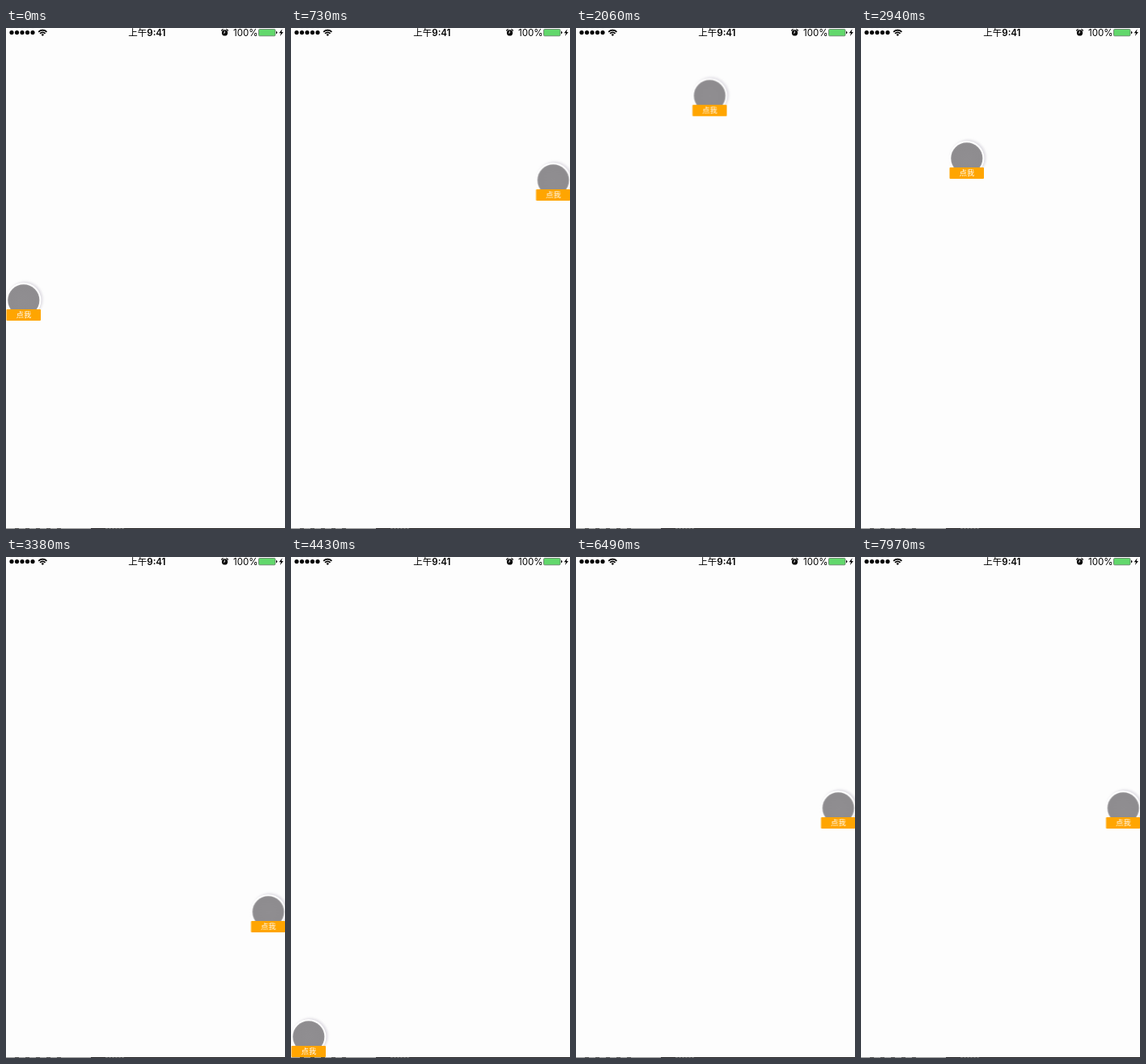
Write an HTML page that moves like this. It is 345x618 px and loops after 9880 ms.

```html
<!DOCTYPE html>
<html lang="zh-CN">
<head>
<meta charset="utf-8">
<title>Floating button</title>
<style>
  html, body { margin: 0; width: 100%; height: 100%; overflow: hidden; background: #fdfdfd; }
  svg { display: block; width: 345px; height: 618px; }
  text { font-family: Inter, "Noto Sans CJK SC", "Noto Sans CJK", sans-serif; }
</style>
</head>
<body>
<svg viewBox="0 0 345 618">
  <defs>
    <radialGradient id="disk">
      <stop offset="0" stop-color="#908e91"/>
      <stop offset=".9" stop-color="#8e8c8f"/>
      <stop offset="1" stop-color="#989699"/>
    </radialGradient>
    <filter id="soft" x="-30%" y="-30%" width="160%" height="160%">
      <feGaussianBlur stdDeviation="1.5"/>
    </filter>
  </defs>
  <rect width="345" height="618" fill="#fdfdfd"/>

  <g id="status">
    <path d="M7 5.6H34" stroke="#000" stroke-width="5.2" stroke-linecap="round" stroke-dasharray="0 6.5"/>
    <g fill="none" stroke="#000" stroke-width="1.7">
      <path d="M40.2 4.8A7.3 7.3 0 0 1 50.4 4.8"/>
      <path d="M42.1 6.8A4.5 4.5 0 0 1 48.5 6.8"/>
    </g>
    <path d="M43.6 8.2A2.4 2.4 0 0 1 47 8.2L45.3 10Z"/>
    <text x="174.4" y="9.6" font-size="11.5" font-weight="600" text-anchor="middle"><tspan font-weight="500">上午</tspan>9:41</text>
    <circle cx="270.5" cy="5.9" r="3.6"/>
    <path d="M266.6 3L268.2 1.6M274.4 3L272.8 1.6" stroke="#000" stroke-width="1.2" stroke-linecap="round"/>
    <path d="M270.5 3.6V6.1H268.7" fill="none" stroke="#fdfdfd" stroke-width=".8"/>
    <text x="281.1" y="9.6" font-size="11.5">100%</text>
    <rect x="312.5" y="1.5" width="20.5" height="8.3" rx="1.2" fill="#62d86c" stroke="#5f7562" stroke-width=".8"/>
    <path d="M334 4Q335.4 4 335.4 5.6T334 7.2Z"/>
    <path d="M341.6 1.3L337.7 6.2H340L338.9 10L342.9 4.9H340.6Z"/>
  </g>

  <g id="edge">
    <path d="M0 617.5H105" stroke="#999"/>
    <path d="M11 617.5H70" stroke="#444" stroke-dasharray="5 8"/>
    <path d="M105 617.5H345" stroke="#1c1a1c"/>
    <path d="M123 617.5H147" stroke="#555" stroke-dasharray="3 1"/>
  </g>

  <g id="button">
    <circle cx="23.6" cy="334.8" r="21.8" fill="#dedbe2" filter="url(#soft)"/>
    <circle cx="21.8" cy="335.8" r="21.6" fill="#fff"/>
    <circle cx="21.8" cy="335.8" r="19.6" fill="url(#disk)"/>
    <rect x=".5" y="347" width="42.5" height="14" rx="1" fill="#ffa500"/>
    <text x="22" y="357" font-size="9.2" fill="#fff" text-anchor="middle">点我</text>
  </g>
</svg>
<script>
  const LOOP = 9880, TICK = 147;
  const LEFT = 0, RIGHT = 302.5;

  // Each drag is first seen at (x, y) and ends docked on a side; y counts from the resting place.
  const drags = [
    { start: 580,  end: 730,  x: 190, y: -105, side: RIGHT, dock: -148 },
    { start: 1620, end: 2210, x: 287, y: -183, side: LEFT,  dock: -281 },
    { start: 2940, end: 3380, x: 109, y: -175, side: RIGHT, dock: 102 },
    { start: 3980, end: 4430, x: 262, y: 128,  side: LEFT,  dock: 256 },
    { start: 5900, end: 6490, x: 13,  y: 236,  side: RIGHT, dock: -26 }
  ];

  const mix = (a, b, p) => a + (b - a) * p;
  const smooth = p => p * p * (3 - 2 * p);
  const easeOut = p => Math.sin(p * Math.PI / 2);

  const pose = (t, x, y) => ({
    offset: t / LOOP,
    transform: `translate(${x}px, ${y}px)`,
    easing: "steps(1, end)"
  });

  // The picture advances in ticks, so a drag is a few held poses.
  function dragPoses({ start, end, x, y, side, dock }) {
    const n = Math.round((end - start) / TICK);
    return Array.from({ length: n + 1 }, (_, i) => {
      const p = i / n;
      return pose(mix(start, end, p), mix(x, side, smooth(p)), mix(y, dock, easeOut(p)));
    });
  }

  const last = drags[drags.length - 1];
  document.getElementById("button").animate(
    [pose(0, LEFT, 0), ...drags.flatMap(dragPoses), pose(LOOP, last.side, last.dock)],
    { duration: LOOP, iterations: Infinity }
  );
</script>
</body>
</html>
```
